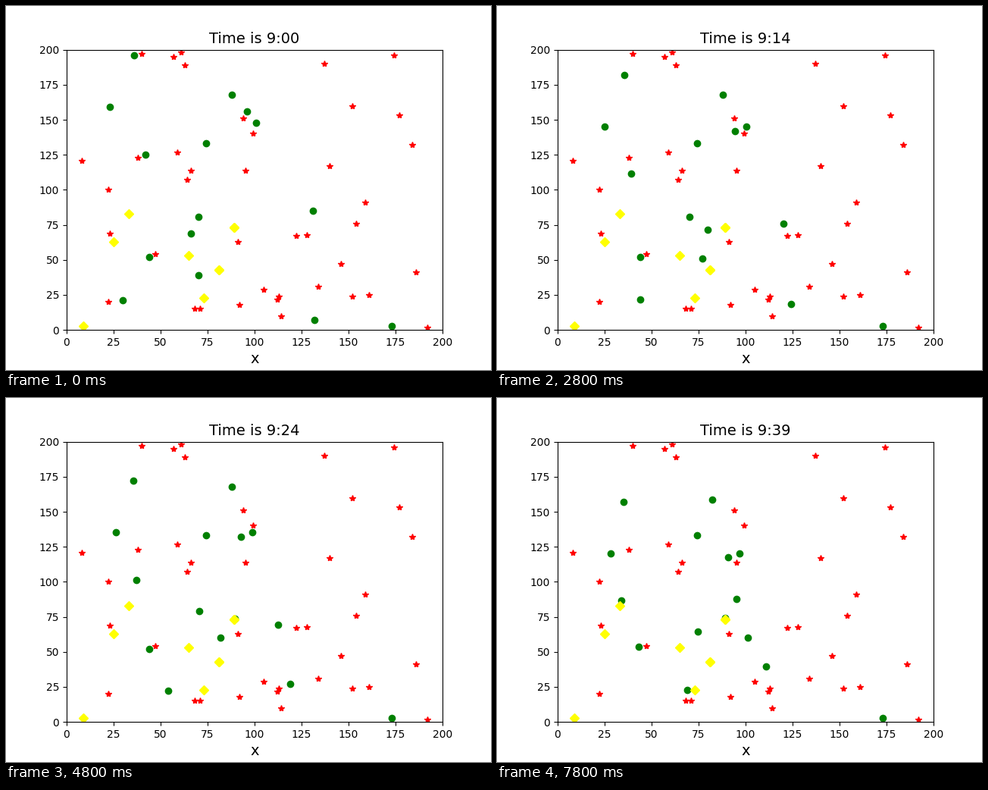
A matplotlib script that plays this animation: 640 by 480 pixels, repeating every 8000 ms.

```python
import numpy as np
import matplotlib.pyplot as plt
from matplotlib.animation import FuncAnimation

FRAMES, INTERVAL = 40, 200

HOMES = [
    (40, 197), (57, 195), (61, 198), (63, 189), (137, 190), (174, 196),
    (152, 160), (177, 153), (184, 132), (94, 151), (99, 140), (59, 127),
    (38, 123), (8, 121), (66, 114), (95, 114), (140, 117), (64, 107),
    (22, 100), (159, 91), (154, 76), (23, 69), (122, 67), (128, 68),
    (91, 63), (47, 54), (146, 47), (186, 41), (134, 31), (105, 29),
    (113, 24), (112, 22), (152, 24), (161, 25), (22, 20), (92, 18),
    (68, 15), (71, 15), (114, 10), (192, 2),
]

# Two shops share their spot with another one.
A, B, C, D = (33, 83), (25, 63), (89, 73), (81, 43)
E = (73, 23)
SHOPS = [A, B, C, C, (65, 53), D, D, E, (9, 3)]

# (minute of departure, stops along the way)
WALKERS = [
    (0, [(36, 196), A]),
    (0, [(23, 159), A]),
    (0, [(42, 125), A]),
    (0, [(96, 156), D]),
    (11, [(101, 148), C]),
    (28, [(88, 168), B]),
    (0, [(74, 133)]),
    (0, [(131, 85), D]),
    (22, [(70, 81), D]),
    (0, [(66, 69), C, (137, 190)]),
    (0, [(70, 39), C, (94, 151)]),
    (0, [(30, 21), E]),
    (0, [(132, 7), C]),
    (37, [(44, 52), A]),
    (0, [(173, 3)]),
]


def position(minute, start, stops):
    """Walk one unit per minute, stepping onto a stop when under one unit away."""
    steps = max(0, minute - start)
    pos = np.array(stops[0], float)
    for stop in stops[1:]:
        way = np.array(stop) - pos
        dist = np.hypot(*way)
        if steps < int(dist):
            return pos + way / dist * steps
        steps -= int(dist)
        pos = np.array(stop, float)
    return pos


fig, ax = plt.subplots(figsize=(6.4, 4.8), dpi=100)
ax.set_xlim(0, 200)
ax.set_ylim(0, 200)
ax.set_xlabel("x", fontsize=14)
title = ax.set_title("Time is 9:00", fontsize=14)
people, = ax.plot([], [], "o", color="green")
ax.plot(*zip(*HOMES), "*", color="red")
ax.plot(*zip(*SHOPS), "D", color="yellow")


def update(minute):
    spots = [position(minute, *walker) for walker in WALKERS]
    people.set_data(*zip(*spots))
    title.set_text(f"Time is 9:{minute:02d}")
    return people, title


anim = FuncAnimation(fig, update, frames=FRAMES, interval=INTERVAL,
                     repeat=True, repeat_delay=0, blit=False)
plt.show()
```
